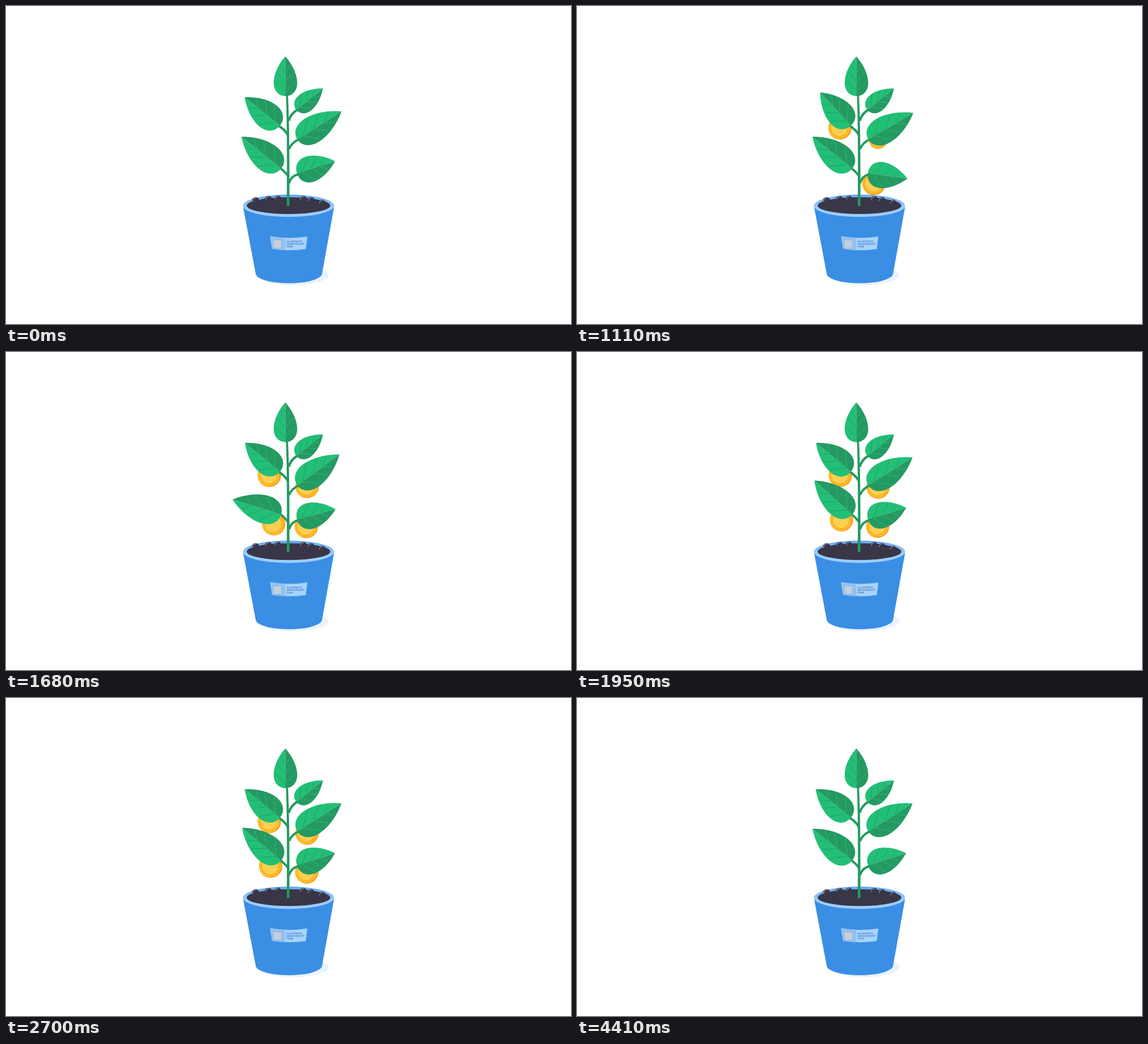
An HTML page for the animation above (4530 ms loop, 960 px wide and 540 px high).

```html
<!DOCTYPE html>
<html lang="en">
<head>
<meta charset="utf-8">
<title>Growing coins</title>
<style>
  html, body { margin: 0; width: 100%; height: 100%; overflow: hidden; background: #fff; }
  svg { display: block; width: 100%; height: 100%; }
  .stems { fill: none; stroke: #239a61; stroke-width: 4; }
  .bumps { fill: #393647; stroke: #24222f; stroke-width: .8; }
  .bumps .shine { fill: none; stroke: #b9b7c4; stroke-width: .9; }
  .label text { font: 500 4px Roboto, sans-serif; letter-spacing: .25px; fill: #2c6cb8; }
</style>
</head>
<body>
<svg viewBox="0 0 960 540">
  <defs>
    <linearGradient id="rim" x1="0" y1="0" x2="0" y2="1">
      <stop offset="0" stop-color="#62a7ef"/>
      <stop offset=".6" stop-color="#9bccff"/>
    </linearGradient>
  </defs>

  <ellipse cx="487" cy="457" rx="61" ry="17" fill="#e9f3fd"/>
  <path d="M403 342L424.3 455A56.4 16.5 0 0 0 537 455L557.3 342Z" fill="#3a8ee4"/>
  <ellipse cx="480" cy="339.3" rx="77.5" ry="19" fill="url(#rim)"/>
  <ellipse cx="480" cy="339" rx="71" ry="14.3" fill="#393647"/>
  <g class="bumps" id="bumps"></g>

  <g class="label">
    <path d="M448.8 391Q480 396.5 512 391.5L509.3 412.7Q480 417 452.3 412.3Z" fill="#a9d3fc" stroke="#78b6f4" stroke-width=".8"/>
    <path d="M450.5 392.3Q461 394.3 472 394.6V414Q462 413.7 453.3 411.8Z" fill="#93bfec"/>
    <path d="M473.3 394.5V414" stroke="#5b9fe6" stroke-width=".7"/>
    <rect x="455" y="398" width="12.5" height="12.5" fill="#c6ced9"/>
    <g transform="rotate(-1 476 405)">
      <text x="476.5" y="401.5">HALVERWICK</text>
      <text x="476.5" y="405.8">IMPROVEMENT</text>
      <text x="476.5" y="410.1">FUND</text>
    </g>
  </g>

  <g id="coins"></g>
  <path d="M475.6 150Q478 200 477 339.5H481.6Q482 200 479 150Z" fill="#239a61"/>
  <g class="stems">
    <path d="M479.5 220Q475 211 463 203"/>
    <path d="M480 290Q476 283 465 274.5"/>
    <path d="M481 243Q484 233 498 226"/>
    <path d="M481 301Q484 289 497 285.5"/>
    <path d="M480.5 195Q483 184 495 176"/>
  </g>
  <g id="leaves"></g>
</svg>

<script>
const LOOP = 4530, LIGHT = '#22bf76', DARK = '#249a62';
const GROW = 600, DROP_START = 350, DROP = 370, SWING = 340;
const VANISH_START = 4110, VANISH = 300;

// base = pivot of the leaf; coin = resting centre
const plants = [
  { base: [475, 153], tip: [474.5, 85.5], width: 40 },
  { base: [493.3, 176.3], tip: [538.5, 140], width: 33 },
  { base: [465.5, 203], tip: [405.5, 155], width: 46, coin: [447.5, 209.7], start: 30, sag: -26.5 },
  { base: [494.3, 284], tip: [559, 263.5], width: 44.5, coin: [511, 295.5], start: 360, sag: 26 },
  { base: [495, 226.5], tip: [570, 179], width: 46, coin: [511.5, 229.5], start: 690, sag: 20.7 },
  { base: [467.5, 276], tip: [400, 222], width: 48, coin: [450, 286], start: 970, sag: -21.5 }
];

const byId = id => document.getElementById(id);

function add(parent, name, attrs = {}) {
  const node = document.createElementNS('http://www.w3.org/2000/svg', name);
  for (const key in attrs) node.setAttribute(key, attrs[key]);
  return parent.appendChild(node);
}

function drawLeaf({ base, tip, width }) {
  const group = add(byId('leaves'), 'g');
  const dx = tip[0] - base[0], dy = tip[1] - base[1], length = Math.hypot(dx, dy);
  const leaf = add(group, 'g', {
    transform: `translate(${base}) rotate(${Math.atan2(dy, dx) * 180 / Math.PI})`
  });
  for (const side of [-1, 1]) {
    const at = (x, y) => `${x * length} ${side * y * width / 2} `;
    const lit = side < 0;
    add(leaf, 'path', {
      d: 'M' + at(0, 0) + 'C' + at(0, .62) + at(.14, 1) + at(.33, 1) +
         'C' + at(.6, 1) + at(.86, .42) + at(1, 0) + 'Z',
      fill: lit ? LIGHT : DARK
    });
    for (const [from, to, out] of [[.13, .38, .9], [.37, .6, .72], [.6, .77, .42]])
      add(leaf, 'path', {
        d: 'M' + at(from, 0) + 'L' + at(to, out),
        stroke: lit ? DARK : '#35b97c', 'stroke-width': .8
      });
  }
  return group;
}

function drawCoin([x, y]) {
  const group = add(byId('coins'), 'g');
  add(group, 'circle', { cx: x, cy: y, r: 19.8, fill: '#f9a01b' });
  add(group, 'circle', { cx: x - 1.2, cy: y, r: 18.6, fill: '#ffba2b' });
  add(group, 'circle', { cx: x - 1, cy: y, r: 14.5, fill: '#ffcf50', stroke: '#f6a91f' });
  return group;
}

for (const [x, y, r] of [[424, 331, 6], [446, 329, 6], [462, 328, 5.5], [505, 329, 6], [518, 331, 6], [537, 335, 5.5]]) {
  add(byId('bumps'), 'path', { d: `M${x - r} ${y}A${r} ${r} 0 0 1 ${x + r} ${y}` });
  add(byId('bumps'), 'path', { class: 'shine', d: `M${x - r + 1} ${y}A${r - 1} ${r - 1} 0 0 1 ${x + 1} ${y - r + 1}` });
}

for (const plant of plants) {
  plant.leaf = drawLeaf(plant);
  if (plant.coin) plant.coinNode = drawCoin(plant.coin);
}

const clamp = v => Math.min(1, Math.max(0, v));
const smooth = v => { v = clamp(v); return v * v * (3 - 2 * v); };
const cosine = v => (1 - Math.cos(Math.PI * clamp(v))) / 2;

// Fraction of the full sag: drop under the weight, then settle in shrinking swings
function sway(age) {
  const sinceDrop = age - DROP_START - DROP;
  if (sinceDrop < 0) return cosine((age - DROP_START) / DROP);
  const peaks = [1, -.32, .18, -.06, 0];
  const i = Math.floor(sinceDrop / SWING);
  if (i >= peaks.length - 1) return 0;
  return peaks[i] + (peaks[i + 1] - peaks[i]) * cosine(sinceDrop / SWING - i);
}

function render(now) {
  const time = now % LOOP;
  const remaining = 1 - smooth((time - VANISH_START) / VANISH);
  for (const { base, coin, start, sag, leaf, coinNode } of plants) {
    if (!coin) continue;
    const age = time - start;
    const turn = `rotate(${sag * sway(age)} ${base})`;
    const size = smooth(age / GROW) * remaining;
    const [x, y] = [coin[0], coin[1] - 13];
    leaf.setAttribute('transform', turn);
    coinNode.setAttribute('transform', `${turn} translate(${x} ${y}) scale(${size}) translate(${-x} ${-y})`);
  }
  requestAnimationFrame(render);
}
render(performance.now());
</script>
</body>
</html>
```
